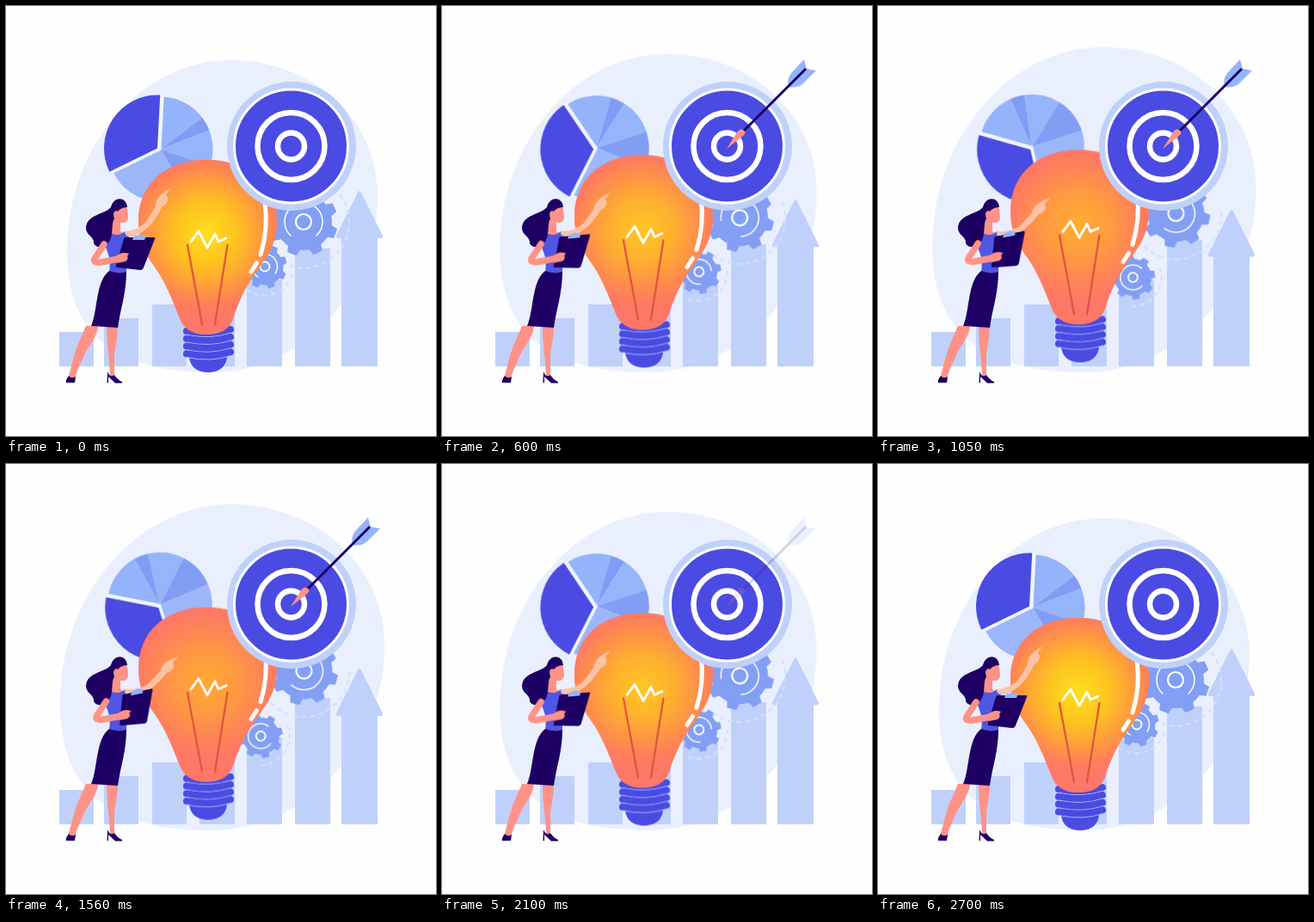
Recreate the animation shown at these times as an HTML page. Size 500x500 px, loop 2760 ms.

```html
<!DOCTYPE html>
<html lang="en">
<head>
<meta charset="utf-8">
<title>Bright idea</title>
<style>
  html, body { margin: 0; width: 100%; height: 100%; overflow: hidden; background: #fefefe; }
  svg { display: block; width: 100vw; height: 100vh; }
  .sway, .glow {
    animation: sway 2760ms cubic-bezier(.35, 0, .65, 1) infinite;
    transform-origin: var(--at, 0 0);
  }
  .glow { animation-name: dim; }
  .dart { animation: dart 2760ms infinite; }
  @keyframes sway {
    0%, 97.8%, 100% { transform: none; }
    47.8%, 50% { transform: var(--to); }
  }
  @keyframes dim {
    0%, 97.8%, 100% { opacity: 1; }
    47.8%, 50% { opacity: 0; }
  }
  @keyframes dart {
    0%, 9% { transform: translate(185px, -185px); opacity: 1; animation-timing-function: ease-out; }
    18.5%, 73% { transform: none; opacity: 1; }
    79% { transform: none; opacity: 0; }
    79.1%, 100% { transform: translate(185px, -185px); opacity: 0; }
  }
  .pale { fill: #bfd1fa; }
  .blue { fill: #4a4be2; }
  .sky { fill: #93b4fa; }
  .ink { fill: #1e0064; }
  .skin { fill: #ff9287; }
  .line { fill: none; stroke: #fff; stroke-linecap: round; stroke-linejoin: round; }
  .dash { fill: none; stroke: #d3dffc; stroke-width: 2; stroke-dasharray: 6 4; }
  .gear { fill: #829ff4; }
</style>
</head>
<body>
<svg viewBox="0 0 500 500">
  <defs>
    <radialGradient id="warm" gradientUnits="userSpaceOnUse" cx="233" cy="267" r="92">
      <stop offset="0" stop-color="#ffa832"/>
      <stop offset=".4" stop-color="#ff9745"/>
      <stop offset=".7" stop-color="#ff8459"/>
      <stop offset=".92" stop-color="#ff7867"/>
    </radialGradient>
    <radialGradient id="lit" gradientUnits="userSpaceOnUse" cx="233" cy="265" r="100">
      <stop offset="0" stop-color="#fde01c"/>
      <stop offset=".36" stop-color="#fdc31f"/>
      <stop offset=".6" stop-color="#fea139"/>
      <stop offset=".82" stop-color="#ff8158"/>
      <stop offset=".95" stop-color="#ff7867"/>
    </radialGradient>
    <clipPath id="floor"><path d="M0 0H500V419H0Z"/></clipPath>
    <path id="glass" d="M233 179C185 179 154 208 154 250C154 275 163 289 172 302C186 321 194 343 202 363C207 377 220 382 233 382C247 382 259 377 264 364C270 343 281 321 296 302C305 289 315 275 315 250C315 208 281 179 233 179Z"/>
  </defs>

  <path class="sway" style="--at:252px 426px;--to:scale(1.047)" fill="#e9effd"
    d="M262 63C350 63 432 125 432 222C432 330 345 426 240 426C130 426 71 385 71 285C71 164 156 63 262 63Z"/>

  <g class="pale" clip-path="url(#floor)">
    <path d="M62 379h40v40h-40zM114 363h40v56h-40zM170 347h40v72h-40zM225 331h41v88h-41zM280 318h41v101h-41z"/>
    <path class="sway" style="--to:translateY(-11px)" d="M336 282h41v160h-41z"/>
    <path class="sway" style="--to:translateY(24px)" d="M409 217Q411 213 413 217L438 267Q439 270 436 270H432V440H390V270H386Q383 270 384 267Z"/>
  </g>

  <g class="sway" style="--to:translate(.5px,-11px)">
    <g class="sway" style="--at:346px 251px;--to:rotate(40deg)">
      <path class="dash" d="M388 219A53 53 0 0 1 330 302"/>
    </g>
    <g class="sway" style="--at:346px 251px;--to:rotate(90deg)">
      <path class="gear" data-gear="346 251 33 40 20"/>
      <circle class="line" cx="346" cy="251" r="9" stroke-width="2.2"/>
      <path class="line" stroke-width="1.5" d="M331 267A22 22 0 1 1 361 267"/>
    </g>
  </g>
  <g class="sway" style="--to:translate(-5px,14px)">
    <g class="sway" style="--at:301px 303px;--to:rotate(-40deg)">
      <path class="dash" d="M333 312A34 34 0 0 1 279 329"/>
    </g>
    <g class="sway" style="--at:301px 303px;--to:rotate(-90deg)">
      <path class="gear" data-gear="301 303 21.5 26 27"/>
      <circle class="line" cx="301" cy="303" r="5.5" stroke-width="1.8"/>
      <path class="line" stroke-width="1.4" d="M293 315A14.5 14.5 0 1 1 313 311"/>
    </g>
  </g>

  <g id="pie" class="sway" style="--at:177.5px 165.5px;--to:rotate(-86deg)"></g>

  <g class="sway" style="--to:translateY(-13px)">
    <path class="blue" d="M213 374H257V406C257 420 247 426 235 426C223 426 213 420 213 406Z"/>
    <g id="screw" fill="none" stroke-linecap="round"></g>
    <use href="#glass" fill="url(#warm)"/>
    <use class="glow" href="#glass" fill="url(#lit)"/>
    <path d="M211 278L228 370M257.500 278L243 370" fill="none" stroke="#e2553f" stroke-width="2.300" stroke-linecap="round"/>
    <path class="line" stroke-width="2.800" d="M215 274L224 262L234 281L243 265L247 274L256 270"/>
    <path class="line" stroke-width="5" d="M301 228C304 250 302 270 296 289M291.500 299L285 309"/>
  </g>

  <g>
    <circle class="pale" cx="332" cy="163" r="75"/>
    <circle class="blue" cx="331.500" cy="163" r="66" stroke="#fff" stroke-width="3"/>
    <g class="line" stroke-width="6.500">
      <circle cx="331.500" cy="163" r="39"/>
      <circle cx="331.500" cy="163" r="15.500"/>
    </g>
  </g>
  <g class="dart">
    <path class="sky" d="M403 94C401 86 404 80 408 76L421 62L424 73L435 75L420 90C415 95 408 95 403 94Z"/>
    <path d="M349 147L423 73" stroke="#1e0064" stroke-width="3"/>
    <path class="skin" d="M331 166L343 147Q346 142 350 144Q355 147 350 151Z"/>
  </g>

  <g>
    <path class="skin" d="M93 372H107C106 386 96 394 90 408C86 418 82 424 80 434H72C75 422 78 408 83 395ZM117 372H130C130 388 127 395 126 406V432H121C121 416 117 396 117 372Z"/>
    <path class="ink" d="M73 430Q76 434 81 431L80 438H70Q69 435 73 430ZM118 425Q121 433 126 429Q129 434 135 437V438.500H127L119 431V438H117.500Z"/>
    <path class="skin" d="M124 246H133V262L140 266L120 270Z"/>
    <path fill="#5056e4" d="M113 272Q117 266 124 265Q132 268 138 262L143 266Q140 285 140 310L120 311Q122 295 118 286Z"/>
    <path class="ink" d="M120 308Q130 312 140 309C140 334 133 352 130 374L99 372C107 354 104 320 120 308Z"/>
    <path class="skin" d="M126 238C128 232 139 230 141 236L142 245Q142 252 136 252Q130 252 126 246Z"/>
    <path class="ink" d="M141 234C140 221 125 221 122 234C114 243 94 242 93 258C93 267 103 268 102 276C106 284 118 280 121 272C125 264 122 254 126 247Q124 239 128 238C131 241 131 234 141 234Z"/>
    <g class="sway" style="--at:140px 262px;--to:rotate(13deg)">
      <path fill="#fbc2a5" d="M138 262C148 262 158 256 163 251L174 233C174 224 180 218 191 212L186 220C190 224 188 230 182 233C174 248 166 261 150 267C143 269 138 268 138 262Z"/>
    </g>
    <g class="sway" style="--at:140px 300px;--to:translate(4px,-2px) rotate(-12deg)">
      <path class="ink" d="M139 269H172Q174 269 173 271L160 304Q159 307 156 307L129 304Q127 304 128 301L137 271Q137 269 139 269Z"/>
      <path class="sky" d="M149 267H153Q156 264 159 267H163L161 272H147Z"/>
    </g>
    <g class="sway" style="--to:translate(2.500px,-1px)">
      <path d="M114 277L103 294Q101 299 110 298L131 294" fill="none" stroke="#ff9287" stroke-width="7.500" stroke-linecap="round" stroke-linejoin="round"/>
      <path class="skin" d="M128 291Q135 285 143 288L141 291Q143 294 139 297L129 299Z"/>
    </g>
  </g>
</svg>
<script>
  const rad = Math.PI / 180;
  const point = (x, y, r, deg) => `${x + r * Math.cos(deg * rad)} ${y + r * Math.sin(deg * rad)}`;

  function gearPath(x, y, r, tip, phase) {
    const corners = [];
    for (let a = phase; a < phase + 360; a += 45) {
      corners.push(point(x, y, r, a - 13), point(x, y, tip, a - 8),
        point(x, y, tip, a + 8), point(x, y, r, a + 13), point(x, y, r, a + 22));
    }
    return `M${corners.join("L")}Z`;
  }

  const wedge = (x, y, r, from, to, fill) =>
    `<path d="M${x} ${y}L${point(x, y, r, from)}A${r} ${r} 0 0 1 ${point(x, y, r, to)}Z" fill="${fill}"/>`;

  document.querySelectorAll("[data-gear]").forEach(el =>
    el.setAttribute("d", gearPath(...el.dataset.gear.split(" ").map(Number))));

  const cuts = [270, 323, 339, 379, 419, 517];
  const tints = ["#94b3fa", "#809cf4", "#95b4fa", "#829df4", "#9bb7fa"];
  document.getElementById("pie").innerHTML =
    tints.map((c, i) => wedge(179.5, 166.5, 61, cuts[i], cuts[i + 1], c)).join("") +
    `<path d="M${point(178, 166, 63, 273)}L178 166L${point(178, 166, 63, 154)}" fill="none" stroke="#f1f5ff" stroke-width="5"/>` +
    wedge(176, 165.5, 62, 154, 273, "#4a4be2");

  let rings = "";
  for (let y = 378; y < 406; y += 8.8) {
    const d = `M210 ${y}Q238 ${y + 6} 261 ${y - 2}`;
    rings += `<path d="${d}" stroke="#4a4be2" stroke-width="8"/>` +
      `<path d="${d}" stroke="#a9b4fa" stroke-width="1" transform="translate(0 4.2)"/>`;
  }
  document.getElementById("screw").innerHTML = rings;
</script>
</body>
</html>
```
